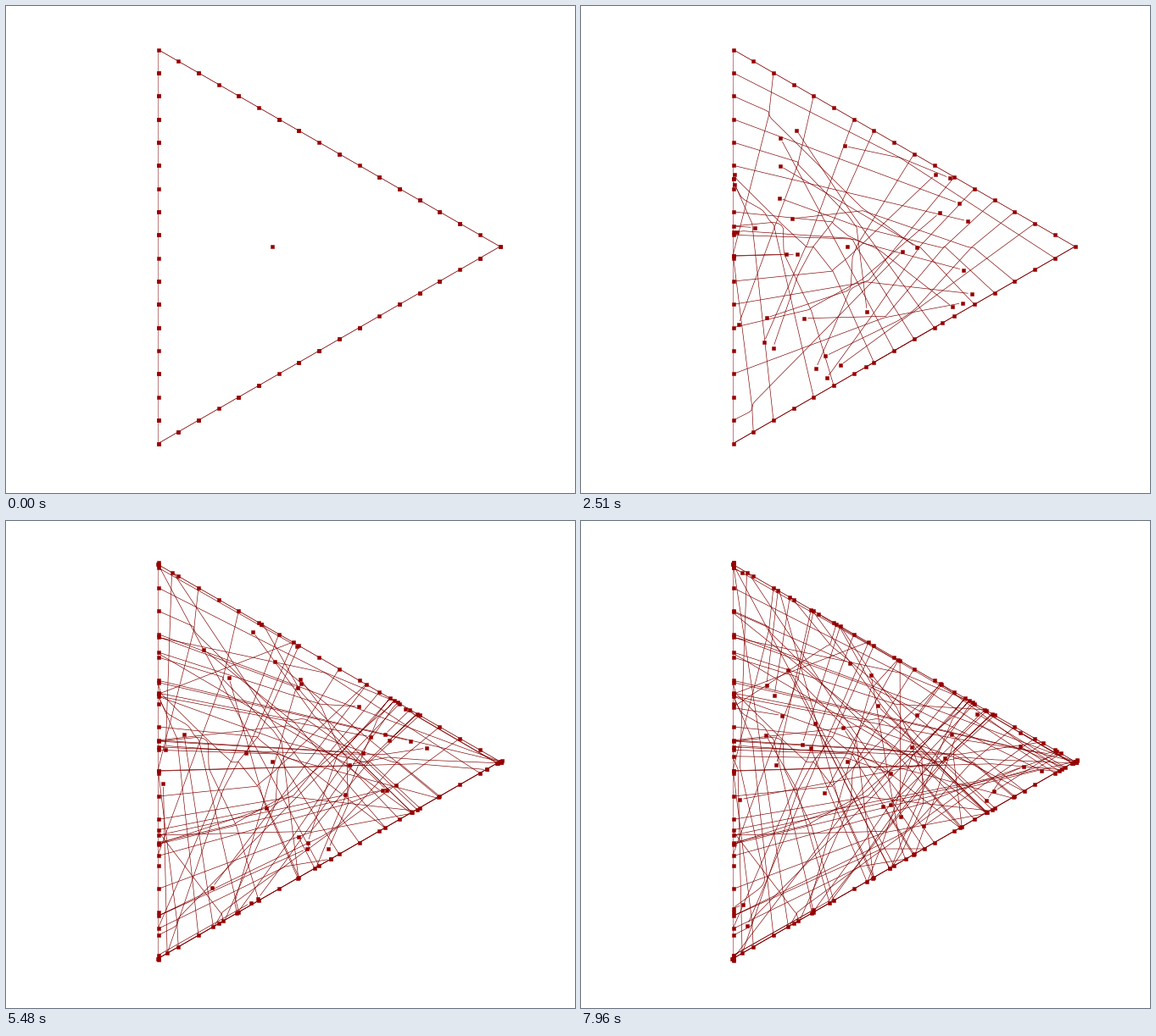
Animation of 671 by 575 pixels, one loop 8 s. Source, as a matplotlib script:

```python
import numpy as np
import matplotlib.pyplot as plt
from matplotlib.animation import FuncAnimation
from matplotlib.collections import LineCollection

W, H, DPI = 671, 575, 100
PX = 72 / DPI
FRAMES, INTERVAL = 250, 32
RED, LINE = "#960000", "#800000"
SPLIT = 17            # divisions per side
STEP = 4.18           # pixels a ball moves per step
REACH, PUSH = 6, 1.0  # range and strength of the push between balls
GAP = 1               # steps left open between a trail and its ball
START = 280           # ms
IDLE = {0, 6, 9, 13, 15, 20, 23, 28, 32, 35, 41, 43, 46, 48, 50}

# Side i runs from corner i to corner i + 1.
corners = np.array([(179.5, 51.5), (179.5, 516.5), (582.5, 284.0)])
sides = np.roll(corners, -1, axis=0) - corners
sides /= np.hypot(*sides.T)[:, None]
inward = np.column_stack([sides[:, 1], -sides[:, 0]])


def unit(v):
    return v / (np.hypot(*v) or 1)


def rim(s):
    """Point on the triangle, s in divisions counted from the top left corner."""
    side, rest = divmod(s, SPLIT)
    a, b = corners[side], corners[(side + 1) % 3]
    return a + (b - a) * rest / SPLIT


def aim(pos, side):
    """Heading from a point on a side to the corner facing that side."""
    return unit(corners[(side + 2) % 3] - pos)


def steps_at(ms):
    """Steps done so far; each one takes longer as the picture fills up."""
    if ms < START:
        return 0
    first_delay, growth = 30.3, 0.0025
    return 1 + int(np.log1p(growth * (ms - START) / first_delay) / growth)


def simulate(steps):
    """Balls fly to the facing corner, push each other aside and aim anew at walls."""
    starts = [s for s in range(3 * SPLIT) if s not in IDLE]
    pos = np.array([rim(s) for s in starts])
    heading = np.array([aim(p, 0 if s <= SPLIT else s // SPLIT)
                        for p, s in zip(pos, starts)])
    history, hits = [pos.copy()], [[]]
    for _ in range(steps):
        new_hits = []
        for i in range(len(pos)):
            away = pos[i] - pos
            dist = np.hypot(*away.T)
            near = (dist > 0) & (dist < REACH)
            if near.any():
                weight = PUSH * (1 / dist[near] - 1 / REACH)
                heading[i] = unit(heading[i] + weight @ away[near])
            pos[i] += STEP * heading[i]
            for side in range(3):
                depth = (pos[i] - corners[side]) @ inward[side]
                if depth < -0.01:
                    pos[i] -= depth * inward[side]
                    heading[i] = aim(pos[i], side)
                    new_hits.append(pos[i].copy())
        history.append(pos.copy())
        hits.append(new_hits)
    return np.array(history), hits


history, hits = simulate(steps_at(FRAMES * INTERVAL))

fig = plt.figure(figsize=(W / DPI, H / DPI), dpi=DPI, facecolor="white")
ax = fig.add_axes([0, 0, 1, 1])
ax.set_xlim(0, W)
ax.set_ylim(H, 0)
ax.axis("off")

for i, width in enumerate([0.5, 0.8, 0.8]):
    ax.plot(*corners[[i, (i + 1) % 3]].T, color=LINE, lw=width * PX, snap=False)

trails = LineCollection([], colors=LINE, linewidths=0.65 * PX, zorder=2)
ax.add_collection(trails)

square = dict(marker="s", ms=5 * PX, mew=0.5 * PX, color=RED, ls="none", zorder=3)
fixed = np.vstack([[rim(s) for s in range(3 * SPLIT)], corners.mean(axis=0)])
ax.plot(*fixed.T, **square)
moving, = ax.plot([], [], **square)


def update(frame):
    n = steps_at(frame * INTERVAL)
    trails.set_segments(history[:max(n + 1 - GAP, 1)].swapaxes(0, 1))
    marks = [p for group in hits[:n + 1] for p in group]
    moving.set_data(*np.vstack([history[n], *marks]).T)
    return trails, moving


anim = FuncAnimation(fig, update, frames=FRAMES, interval=INTERVAL,
                     repeat=True, repeat_delay=0)
plt.show()
```
